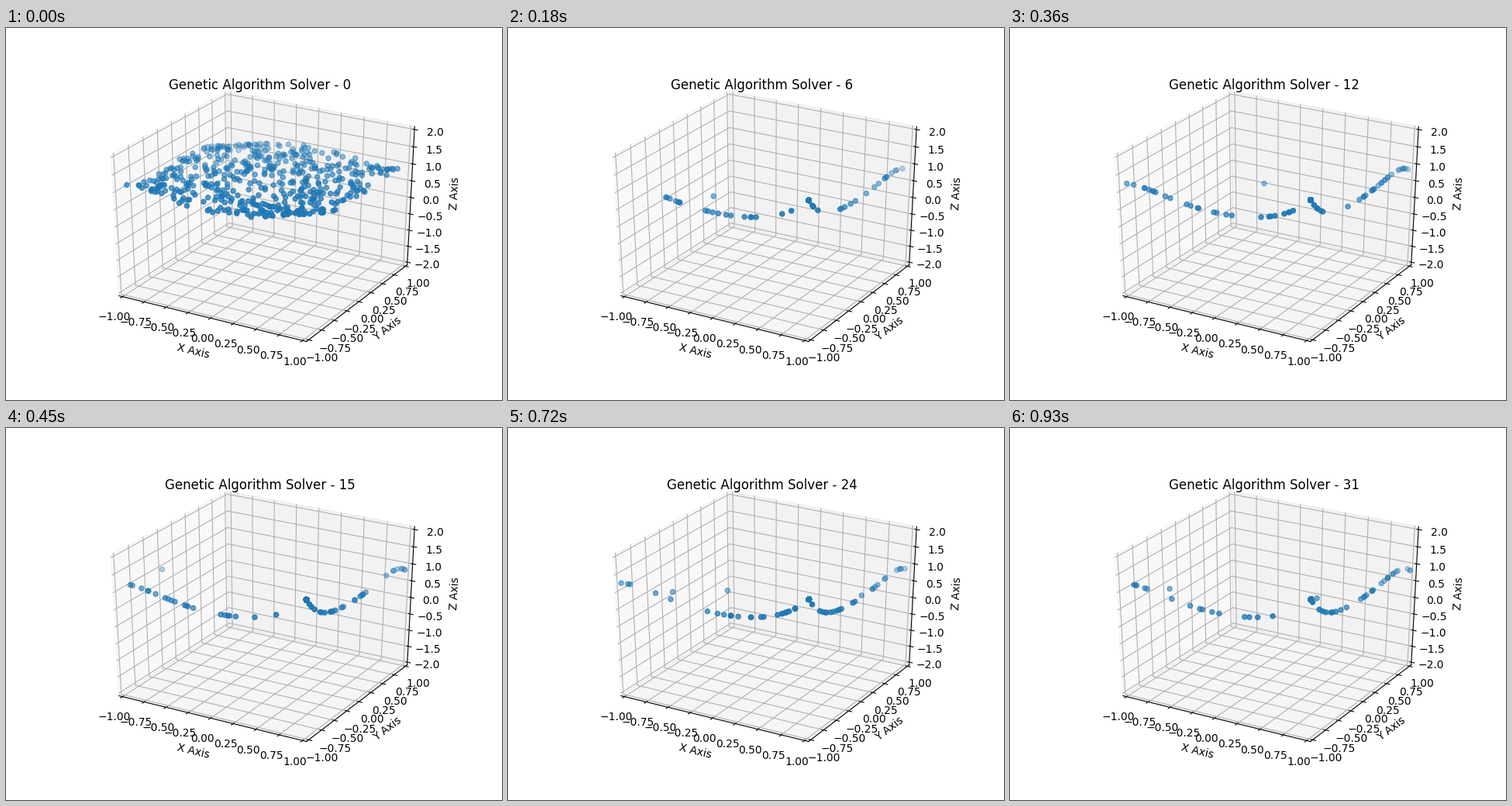
These frames come from a looping animation (640x480 px, 0.96 s). A matplotlib script:

```python
import numpy as np
import matplotlib.pyplot as plt
from matplotlib.animation import FuncAnimation

GENERATIONS = 32
INTERVAL = 30
POPULATION = 500
PARENTS = 50
MUTATION = 0.05

BLUE = (0x1F / 255, 0x77 / 255, 0xB4 / 255)
GRID = "#b0b0b0"

# Plot volume; the panes reach a little past the limits
HALF = np.array([1.0, 1.0, 2.0])
EDGE = HALF * 25 / 24
STEP = HALF / 6
LABEL_UNIT = 0.07702 * STEP  # one point of label padding

# Camera: elevation 30, azimuth -60, distance 10
ELEV, AZIM, DIST = np.radians(30), np.radians(-60), 10
VIEW = np.array([np.cos(ELEV) * np.cos(AZIM),
                 np.cos(ELEV) * np.sin(AZIM),
                 np.sin(ELEV)])
RIGHT = np.array([-np.sin(AZIM), np.cos(AZIM), 0])
UP = np.cross(VIEW, RIGHT)


def project(points):
    """Return pixel x, pixel y (upwards) and depth of 3D points."""
    p = np.asarray(points, float) / (2 * HALF)
    dist = DIST - p @ VIEW
    x = 80 + 496 * (p @ RIGHT / dist + 0.095) / 0.185
    y = 52.8 + 369.6 * (p @ UP / dist + 0.095) / 0.185
    return x, y, -DIST / dist


# ---- genetic algorithm ----

def fitness(pop):
    x, y = pop.T
    return (0.98 + 0.06 * x**2 * y**2
            + 0.335 * x**5 * y**2 - 0.555 * x**2 * y**5)


def evolve(pop, rng):
    parents = pop[np.argsort(-fitness(pop))[:PARENTS]]
    pick = rng.integers(PARENTS, size=(POPULATION, 2))
    children = np.column_stack([parents[pick[:, 0], 0], parents[pick[:, 1], 1]])
    mutate = rng.random(children.shape) < MUTATION
    children = np.where(mutate, rng.uniform(-1, 1, children.shape), children)
    children[0] = parents[0]
    return children


def run():
    rng = np.random.default_rng(7)
    history = [rng.uniform(-1, 1, (POPULATION, 2))]
    while len(history) < GENERATIONS:
        history.append(evolve(history[-1], rng))
    return history


# ---- static box ----

fig = plt.figure(figsize=(6.4, 4.8), dpi=100, facecolor="white")
ax = fig.add_axes([0, 0, 1, 1])
ax.set_xlim(0, 640)
ax.set_ylim(0, 480)
ax.axis("off")

CORNER = EDGE * [-1, 1, -1]  # where the three panes meet


def with_value(point, index, value):
    moved = np.array(point, float)
    moved[index] = value
    return moved


def flipped(point, index):
    return with_value(point, index, -point[index])


def draw_line(points, color, order):
    x, y, _ = project(points)
    ax.plot(x, y, color=color, lw=0.8, zorder=order)


def draw_pane(index, gray):
    a, b = (index + 1) % 3, (index + 2) % 3
    quad = [CORNER, flipped(CORNER, a),
            flipped(flipped(CORNER, a), b), flipped(CORNER, b)]
    x, y, _ = project(quad)
    ax.fill(x, y, facecolor=(gray,) * 3, edgecolor=(gray,) * 3,
            alpha=0.5, lw=1, zorder=1)


def push_out(point, index, points):
    """Move a point away from the centre across the axis `index`."""
    shift = np.sign(point) * LABEL_UNIT * points
    shift[index] = 0
    return point + shift


def draw_axis(index, name, ticks, digits):
    across = 1 if index == 0 else 0
    order = 2 + index / 4
    base = flipped(CORNER, across)
    ends = [with_value(base, index, s * EDGE[index]) for s in (-1, 1)]
    draw_line(ends, "black", order)

    for value in ticks:
        meet = with_value(CORNER, index, value)
        draw_line([flipped(meet, (index + 1) % 3), meet,
                   flipped(meet, (index + 2) % 3)], GRID, order + 0.1)
        foot = with_value(base, index, value)
        side = np.sign(base[across]) * STEP[across]
        draw_line([with_value(foot, across, base[across] + k * side)
                   for k in (-0.1, 0.2)], "black", order + 0.2)
        x, y, _ = project(push_out(foot, index, 11.5))
        text = f"{value:.{digits}f}".replace("-", "\u2212")
        ax.text(x, y, text, size=10, ha="center", va="top", zorder=3)

    x, y, _ = project(ends)
    angle = np.degrees(np.arctan2(y[1] - y[0], x[1] - x[0]))
    x, y, _ = project(push_out(with_value(base, index, 0), index, 25))
    ax.text(x, y, name, size=10, ha="center", va="center",
            rotation=angle, zorder=3)


plt.rcParams["font.family"] = "DejaVu Sans"
for i, gray in enumerate((0.95, 0.90, 0.925)):
    draw_pane(i, gray)
draw_axis(0, "X Axis", np.linspace(-1, 1, 9), 2)
draw_axis(1, "Y Axis", np.linspace(-1, 1, 9), 2)
draw_axis(2, "Z Axis", np.linspace(-2, 2, 9), 1)

# ---- animation ----

title = ax.text(328, 401.2, "", size=12, ha="center", va="baseline", zorder=6)
dots = ax.scatter([], [], s=20, linewidths=1, zorder=5)
history = run()


def update(n):
    pop = history[n]
    x, y, depth = project(np.column_stack([pop, fitness(pop)]))
    far_first = np.argsort(-depth)
    fade = (depth - depth.min()) / np.ptp(depth)
    colors = np.empty((POPULATION, 4))
    colors[:, :3] = BLUE
    colors[:, 3] = 1 - 0.7 * fade
    dots.set_offsets(np.column_stack([x, y])[far_first])
    dots.set_facecolor(colors[far_first])
    dots.set_edgecolor(colors[far_first])
    title.set_text(f"Genetic Algorithm Solver - {n}")
    return dots, title


anim = FuncAnimation(fig, update, frames=GENERATIONS, interval=INTERVAL,
                     repeat=True, repeat_delay=0)
plt.show()
```
